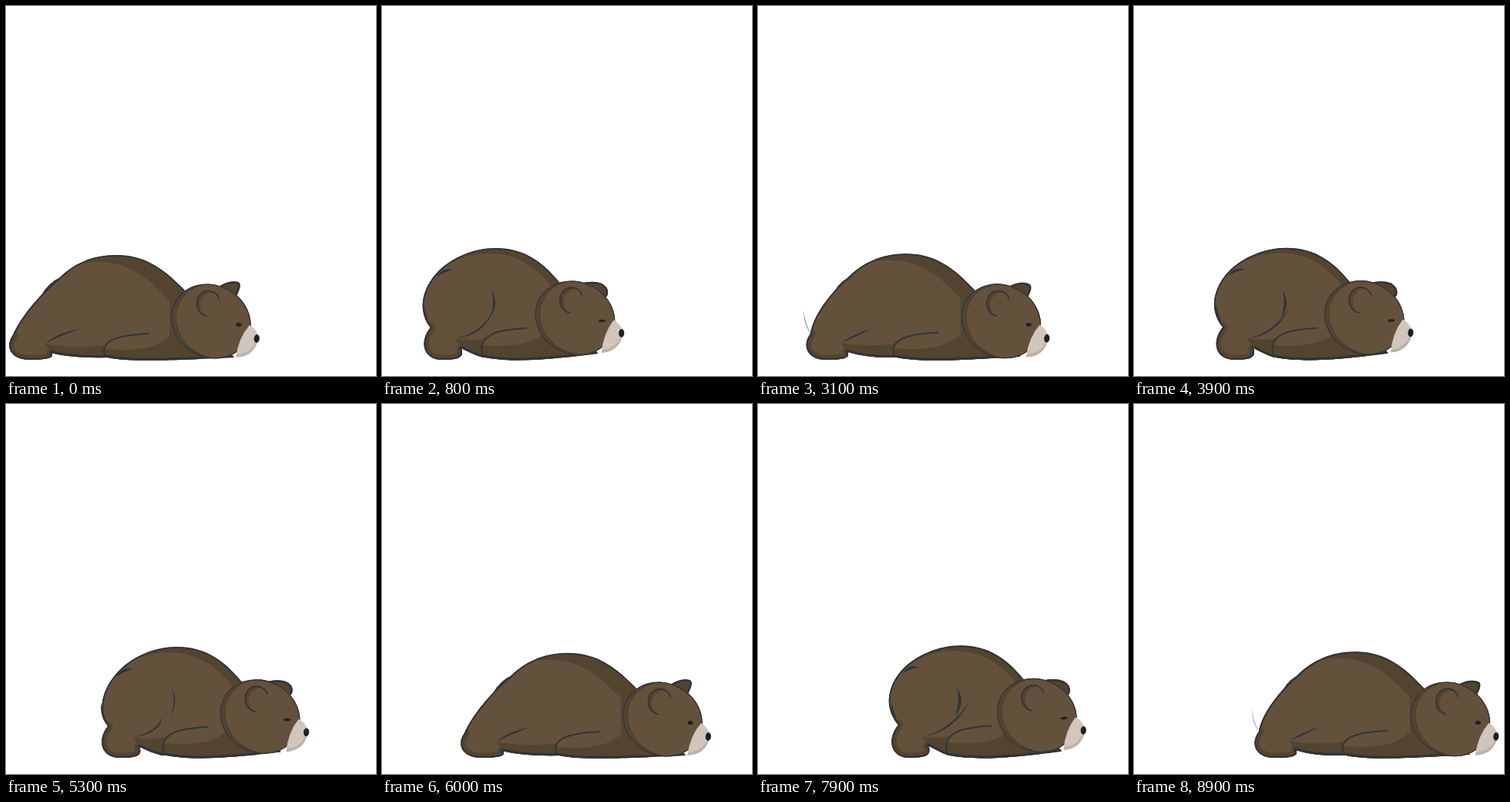
An HTML page with a canvas that plays this animation: 480 px wide and 480 px high, repeating every 9000 ms.

```html
<!DOCTYPE html>
<html lang="en">
<head>
<meta charset="utf-8">
<title>Crawling bear</title>
<style>
html, body { margin: 0; width: 100%; height: 100%; overflow: hidden; background: #fff; }
canvas { display: block; width: 480px; height: 480px; }
</style>
</head>
<body>
<canvas id="stage" width="480" height="480"></canvas>
<script>
const ctx = document.getElementById('stage').getContext('2d');
const LOOP = 9000, STEP = 3000, STRIDE = 49, TICK = 100;
const FUR = '#64513c', SHADE = '#534430', INK = '#313338';
const SNOUT = '#d1c5bc', JAW = '#beb2a8', NOSE = '#202125';

let gather = 0; // 0 stretched out, 1 gathered up
const to = (a, b) => a + (b - a) * gather;

function shape(build) {
  const path = new Path2D();
  build(path);
  return path;
}

const ellipse = (x, y, rx, ry, turn = 0, from = 0, end = 2 * Math.PI) =>
  shape(p => p.ellipse(x, y, rx, ry, turn, from, end));

function fill(path, color) {
  ctx.fillStyle = color;
  ctx.fill(path);
}

function line(path, width, color = INK) {
  ctx.strokeStyle = color;
  ctx.lineWidth = width;
  ctx.stroke(path);
}

function inside(path, paint) {
  ctx.save();
  ctx.clip(path);
  paint();
  ctx.restore();
}

// Fill a shape in shadow, then a shifted copy of its lit part.
function shaded(path, dark, light, dx, dy, lit = path) {
  inside(path, () => {
    fill(path, dark);
    ctx.translate(dx, dy);
    fill(lit, light);
  });
}

// A curved stroke that is pointed at both ends.
function blade(x0, y0, cx, cy, x1, y1, w) {
  const len = Math.hypot(x1 - x0, y1 - y0);
  const nx = (y0 - y1) / len * w, ny = (x1 - x0) / len * w;
  fill(shape(p => {
    p.moveTo(x0, y0);
    p.quadraticCurveTo(cx + nx, cy + ny, x1, y1);
    p.quadraticCurveTo(cx - nx, cy - ny, x0, y0);
  }), INK);
}

function drawBody() {
  const lift = -9 * gather;               // the back rises as the rump comes in
  const heel = to(4, 40), toe = to(59, 90), toeY = to(450, 444);
  const elbow = to(127, 116);
  const rumpX = to(9, 50), rumpY = to(427, 417);
  const neckX = 236 + 1.6 * lift;

  const back = p => {
    p.moveTo(neckX, 373 + lift);
    p.bezierCurveTo(205 + lift, 340 + lift, 180 + lift, 323 + lift, 143 + lift, 323 + lift);
    p.bezierCurveTo(110 + lift / 2, 323 + lift, 88 + lift, 335 + lift, 70 + lift, 352 + lift);
    p.bezierCurveTo(42, to(376, 362), to(18, 30), to(405, 392), rumpX, rumpY);
  };
  const foot = p => {
    const mid = (heel + toe) / 2;
    p.bezierCurveTo(heel - 5, to(440, 435), heel, 459, mid, 459);
    p.bezierCurveTo(toe - 3, 459, toe + 4, 456, toe, toeY);
  };
  const under = p => {
    p.quadraticCurveTo(toe + 25, 457, elbow + 5, 456);
    p.bezierCurveTo(elbow + 35, 462, elbow + 80, 460, to(296, 267), to(456, 451));
  };

  const spine = shape(back);
  const sole = shape(p => { p.moveTo(rumpX, rumpY); foot(p); });
  const base = shape(p => { p.moveTo(toe, toeY); under(p); });
  const body = shape(p => { back(p); foot(p); under(p); });
  const lit = shape(p => {
    back(p);
    p.lineTo(-90, 480);
    p.lineTo(neckX, 480);
  });
  const belly = shape(p => {
    p.moveTo(toe - 9, to(438, 432));
    p.quadraticCurveTo(toe + 22, to(445, 435), elbow + 6, to(440, 430));
    p.lineTo(elbow + 6, 465);
    p.lineTo(toe, 465);
    p.lineTo(toe, toeY);
  });

  shaded(body, SHADE, FUR, to(-24, -9), to(9, 7), lit);
  inside(body, () => {
    fill(belly, SHADE);
    line(sole, 13, SHADE);
    drawArm(elbow);
    line(spine, 3.6);
    line(sole, 4);
    line(base, 6);
  });

  const late = gather ** 5;
  blade(to(46, 58), to(375, 351), to(56, 66), to(361, 342), to(72, 79), to(351, 342), to(2.4, 3.4));
  blade(rumpX - 9, rumpY - 30, rumpX - 8, rumpY - 10, rumpX + 2, rumpY + 2, 3 * gather);
  blade(toe - 8, to(438, 432), to(66, 121), to(427, 424), 95 + 36 * late, 419 - 25 * late, 2.4);
  blade(to(125, 129), 369, to(131, 137), 386, to(125, 127), 404, 2.8 * late);
}

function drawArm(x) {
  const top = to(425, 418);
  const edge = p => {
    p.moveTo(x + 58, top);
    p.bezierCurveTo(x + 25, top + 2, x + 1, top + 6, x, to(447, 445));
    p.quadraticCurveTo(x, 459, x + 14, 460);
  };
  const arm = shape(p => {
    edge(p);
    p.lineTo(x + 130, 462);
    p.lineTo(x + 80, top);
  });
  const shadow = shape(p => {
    p.moveTo(x - 4, to(444, 439));
    p.quadraticCurveTo(x + 65, to(453, 447), x + 88, top);
    p.lineTo(x + 150, top);
    p.lineTo(x + 150, 465);
    p.lineTo(x - 4, 465);
  });
  fill(arm, FUR);
  inside(arm, () => fill(shadow, SHADE));
  line(shape(edge), 2);
}

function drawHead() {
  const pull = gather ** 2;
  ctx.save();
  ctx.translate(266 - 28.8 * pull, 409 - 4.4 * pull);
  ctx.rotate(-0.045 * pull);
  ctx.translate(-266, -409);

  const farEar = shape(p => {
    p.moveTo(276, 364);
    p.quadraticCurveTo(to(290, 302), to(355, 360), to(301, 309), to(358, 372));
    p.quadraticCurveTo(to(308, 313), to(360, 382), to(297, 304), to(380, 386));
  });
  fill(farEar, SHADE);
  inside(farEar, () => line(farEar, 5));

  const skull = ellipse(266, 409, 53, 47, 0.5);
  shaded(skull, SHADE, FUR, 6, 0);
  inside(skull, () => {
    line(skull, 2.6);
    ctx.translate(6, 0);
    line(skull, 0.9, '#43392c');
  });

  const muzzle = shape(p => {
    p.moveTo(316, 414);
    p.quadraticCurveTo(325, 419, 328, 431);
    p.quadraticCurveTo(322, 456, 298, 456);
    p.quadraticCurveTo(302, 430, 316, 414);
  });
  shaded(muzzle, JAW, SNOUT, -1, -4);
  fill(ellipse(325.3, 431.5, 3.6, 5.4, 0.1), NOSE);

  const ear = ellipse(262.5, 386, 15.5, 17);
  shaded(ear, SHADE, FUR, 5, 3);
  line(ellipse(262.5, 386, 15, 16.5, 0, 1.75, 5.9), 1.7);

  const shut = Math.min(1, gather);
  fill(ellipse(302 - shut, 413.5 + shut, 3.5 + shut, 2.7 - shut), NOSE);
  ctx.restore();
}

function draw(t) {
  const y = (t % STEP) / (STEP / 2) - 1;
  gather = 1.11 * (1 - Math.abs(y) ** (y < 0 ? 3 : 2.6));
  ctx.fillStyle = '#fff';
  ctx.fillRect(0, 0, 480, 480);
  ctx.save();
  ctx.translate(STRIDE * t / STEP, 0);
  ctx.lineCap = ctx.lineJoin = 'round';
  drawBody();
  drawHead();
  ctx.restore();
}

const start = performance.now();
function frame() {
  const t = (performance.now() - start) % LOOP;
  draw(Math.floor(t / TICK) * TICK);
  requestAnimationFrame(frame);
}
frame();
</script>
</body>
</html>
```
